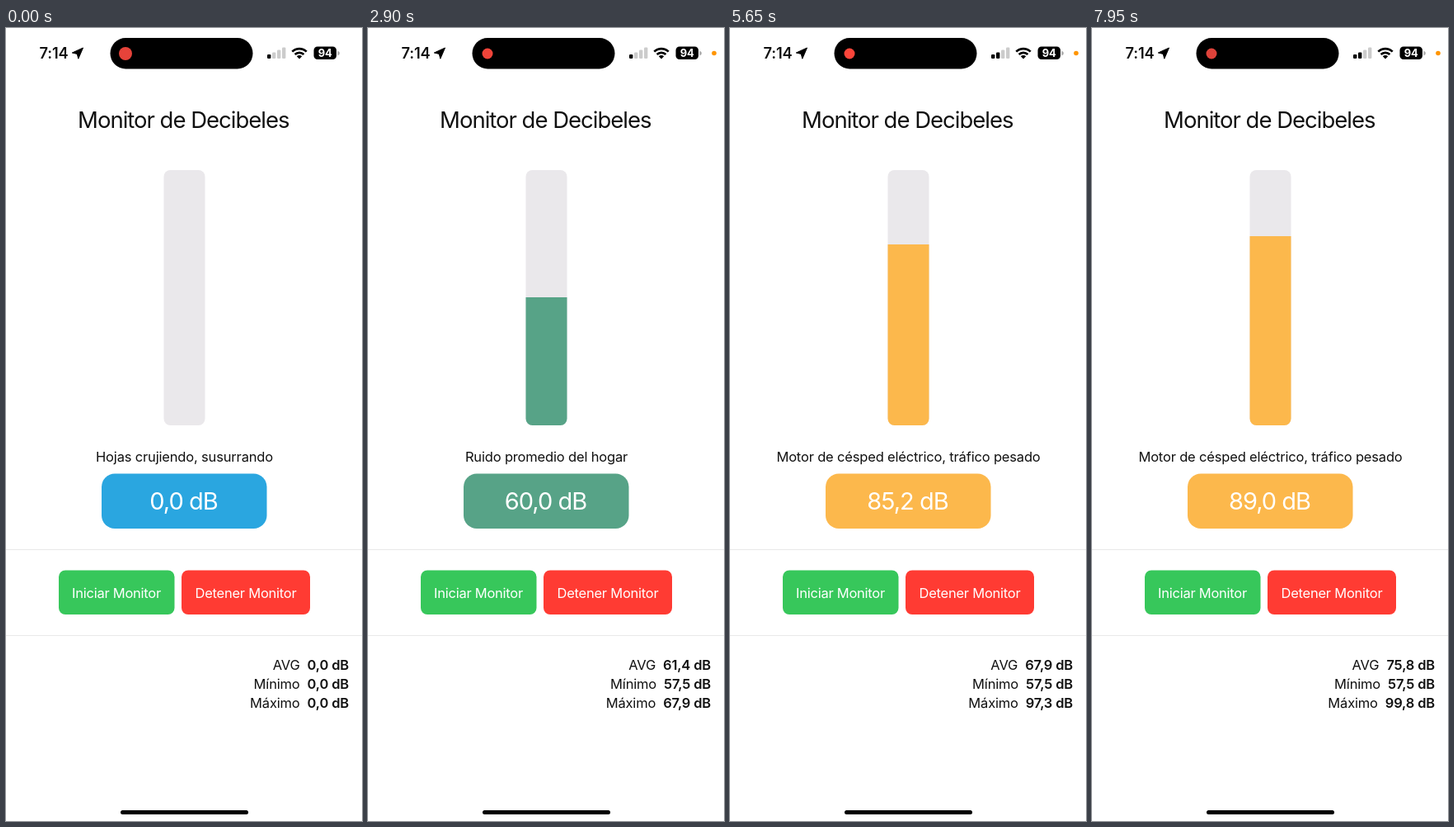
An HTML page that plays this animation: 432 by 960 pixels, repeating every 8000 ms.

```html
<!DOCTYPE html>
<html lang="es">
<head>
<meta charset="utf-8">
<title>Monitor de Decibeles</title>
<style>
html, body { margin: 0; height: 100%; overflow: hidden; background: #fff; }
svg { display: block; width: 100vw; height: 100vh; }
text { font: 400 16.5px Inter, Roboto, sans-serif; letter-spacing: -.17px; fill: #111; text-anchor: middle; }
.title { font-size: 27.5px; letter-spacing: -1px; }
.value { font-size: 29px; letter-spacing: -1px; }
.white { fill: #fff; }
.button { letter-spacing: -.24px; fill: #fff; }
.stat { text-anchor: end; }
.stat tspan { font-weight: 600; }
.line { stroke: #e9e9e9; }
</style>
</head>
<body>
<svg viewBox="0 0 432 960">
  <defs><clipPath id="tube"><rect x="191.5" y="172" width="50" height="309" rx="8"/></clipPath></defs>

  <text x="58" y="37" style="font-size:18.3px;font-weight:600">7:14</text>
  <path d="M93.5 24 87.8 37.2 86.3 31.4 80.3 30Z" stroke="#000" stroke-linejoin="round"/>
  <rect x="126.5" y="12" width="173" height="37.5" rx="18.75"/>
  <circle id="rec" cx="145" cy="31"/>
  <g id="cell"></g>
  <g fill="none" stroke="#000" stroke-width="2.7">
    <path d="M347.3 28.6a12.5 12.5 0 0 1 17.4 0M350.6 32a7.8 7.8 0 0 1 10.8 0"/>
  </g>
  <path d="M356 37.5 352.8 34.3a4.5 4.5 0 0 1 6.4 0Z"/>
  <rect x="373.5" y="22.5" width="27.5" height="15.5" rx="4.5"/>
  <path d="M402.3 28a2.5 2.5 0 0 1 0 5Z" fill="#aaa"/>
  <text class="white" x="387.3" y="35" style="font-size:13px;font-weight:700">94</text>
  <circle id="mic" cx="420" cy="30.5" r="2.8" fill="#ff9500"/>

  <text class="title" x="215.3" y="121">Monitor de Decibeles</text>
  <g clip-path="url(#tube)">
    <rect x="191" y="172" width="51" height="309" fill="#eae8eb"/>
    <rect id="bar" x="191" width="51"/>
  </g>
  <text id="label" x="216.5" y="524.5"></text>
  <rect id="box" x="116" y="539.5" width="200.5" height="66.5" rx="16"/>
  <text id="value" class="value white" x="215.5" y="583.2"></text>

  <path class="line" d="M0 631.5H432M0 735.5H432"/>
  <rect x="64" y="656.5" width="140.5" height="53.5" rx="8" fill="#37c75b"/>
  <text class="button" x="134" y="689.8">Iniciar Monitor</text>
  <rect x="213" y="656.5" width="156" height="53.5" rx="8" fill="#ff3b33"/>
  <text class="button" x="291" y="689.8">Detener Monitor</text>

  <text class="stat" x="416" y="777">AVG<tspan id="avg" dx="9"></tspan></text>
  <text class="stat" x="416" y="800">Mínimo<tspan id="min" dx="9"></tspan></text>
  <text class="stat" x="416" y="823">Máximo<tspan id="max" dx="9"></tspan></text>
  <rect x="139" y="947" width="155" height="5" rx="2.5"/>
</svg>
<script>
const LOOP = 8000, FIRST = 1195, STEP = 250, MIC_ON = 1100, CELL_UP = 5600;
const readings = [
  58.6, 64.6, 57.7, 67.9, 57.5, 63.5, 60.0,
  59.1, 62.4, 60.8, 62.9, 58.6, 61.2, 60.9, 96.8,
  97.3, 86.8, 85.2, 99.8, 83.3, 92.4,
  97.4, 94.6, 91.5, 84.1, 83.6, 84.9, 89.0
];
// upper limit in dB, description, colour
const levels = [
  [50, 'Hojas crujiendo, susurrando', '#2aa6e0'],
  [75, 'Ruido promedio del hogar', '#57a387'],
  [90, 'Motor de césped eléctrico, tráfico pesado', '#fcb84c'],
  [95, 'Metro, conversación gritada', '#f0923d'],
  [Infinity, 'Reproductor de sonido, motocicleta', '#f0923d']
];
const $ = id => document.getElementById(id);
const dB = n => n.toFixed(1).replace('.', ',') + ' dB';
const setText = (id, s) => { if ($(id).textContent !== s) $(id).textContent = s; };

$('cell').innerHTML = [5, 7.5, 10.5, 13.5].map((h, i) =>
  `<rect x="${317 + i * 6}" y="${37 - h}" width="4.4" height="${h}" rx="1.2"/>`).join('');

function draw(t) {
  const count = Math.max(0, Math.floor((t - FIRST) / STEP) + 1);
  const seen = count ? readings.slice(0, count) : [0];
  const now = seen[seen.length - 1];
  const [, name, color] = levels.find(l => now < l[0]);
  const height = Math.round(309 * now / 120);

  $('bar').setAttribute('y', 481 - height);
  $('bar').setAttribute('height', height);
  $('bar').setAttribute('fill', color);
  $('box').setAttribute('fill', color);
  setText('label', name);
  setText('value', dB(now));
  setText('avg', dB(seen.reduce((a, b) => a + b) / seen.length));
  setText('min', dB(Math.min(...seen)));
  setText('max', dB(Math.max(...seen)));

  const glow = .5 - .5 * Math.cos((t - 1800) / 1530 * 2 * Math.PI);
  $('rec').setAttribute('fill', `rgb(${222 + 30 * glow},${66 + 3 * glow},58)`);
  $('rec').setAttribute('r', t < MIC_ON ? 8 : 6.5);
  $('mic').setAttribute('visibility', t < MIC_ON ? 'hidden' : 'visible');
  const lit = t < CELL_UP ? 1 : 2;
  [...$('cell').children].forEach((r, i) => r.setAttribute('fill', i < lit ? '#000' : '#ccc'));
}

const start = performance.now();
function tick() {
  draw((performance.now() - start) % LOOP);
  requestAnimationFrame(tick);
}
tick();
</script>
</body>
</html>
```
